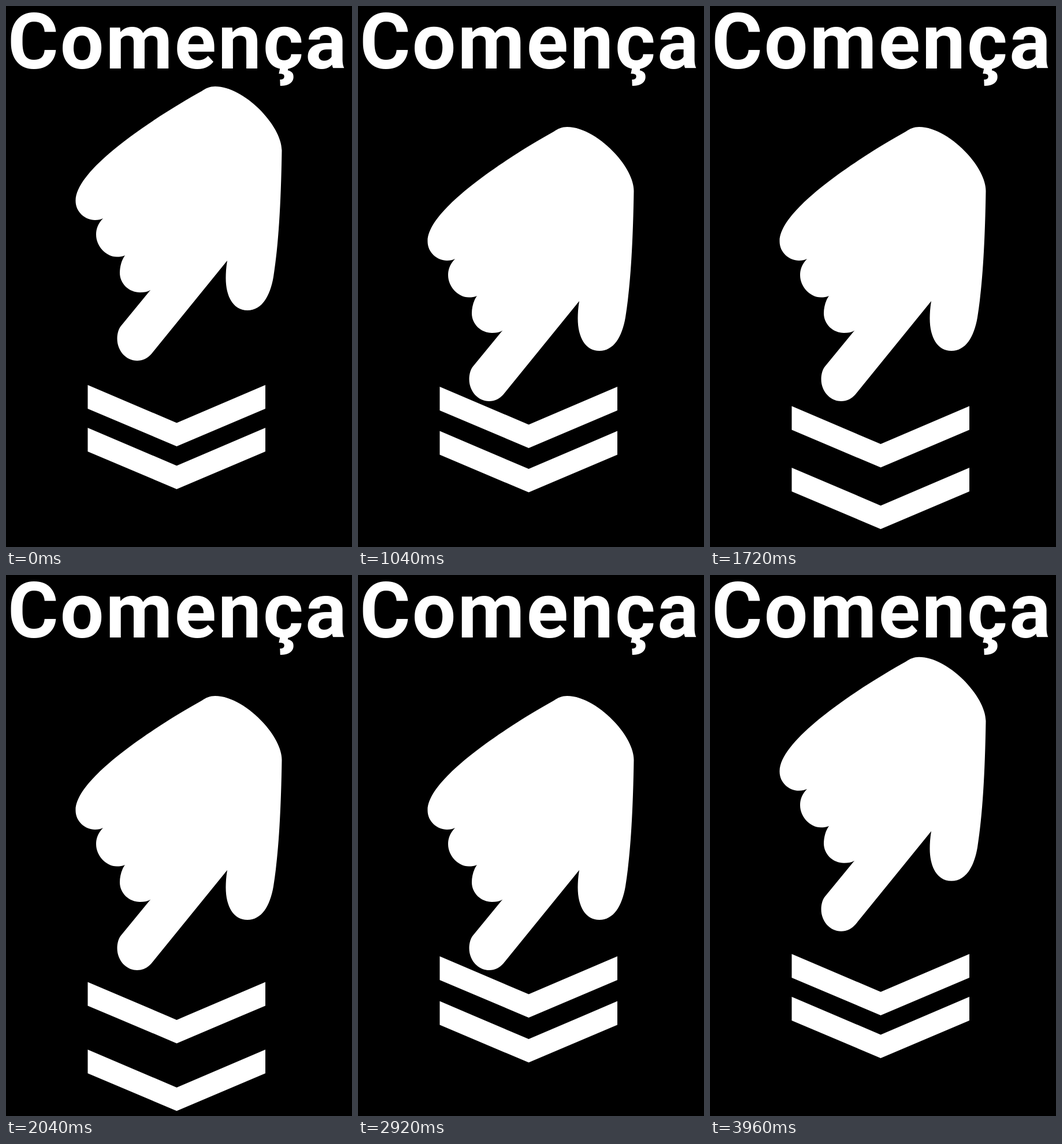
Animation, 599 px wide and 935 px high, one loop 4 s. Source, as an HTML page:

```html
<!DOCTYPE html>
<html lang="ca">
<head>
<meta charset="utf-8">
<title>Comença</title>
<style>
  html, body { margin: 0; width: 100%; height: 100%; overflow: hidden; background: #000; }
  svg { display: block; width: 100%; height: 100%; fill: #fff; }
  text { font: 600 134px Roboto, Arial, sans-serif; letter-spacing: 3px; }
</style>
</head>
<body>
<svg viewBox="0 0 599 935">
  <defs>
    <path id="chevron" d="M141.5 655 L295.5 720.5 L449 655 V696 L295.5 761 L141.5 696 Z"/>
  </defs>
  <text x="3" y="107.5">Comença</text>
  <path id="hand" d="M339 147
    C267 187 121 279 120.5 336 C120 356 137 370 154 370 C160 370 164 369 168 367
    C159 376 156 386 156 395 C156 415 173 433.5 192 433.5 C197 433.5 202 433 206 431
    C200 439 197 451 197 461 C197 480 213 495 232 495 C239 495 245 494 250 491
    L199 553 C195 558 192.5 566 192.5 575 C192.5 596 208 613 227 613 C237 613 245 609 252 601
    L383 440 C381 452 380.5 462 380.5 470 C380.5 503 394 526 418 526
    C442 526 457 503 463 468 C472 412 476 340 477.5 250
    C478 207 412 139 362 139 C353 139 346 142 339 147 Z"/>
  <use id="upper" href="#chevron"/>
  <use id="lower" href="#chevron"/>
</svg>
<script>
  const LOOP = 4000, STEP = 40;
  const [hand, upper, lower] = ['hand', 'upper', 'lower'].map(id => document.getElementById(id));

  const progress = (t, from, to) => Math.min(1, Math.max(0, (t - from) / (to - from)));
  const shift = (part, y) => part.setAttribute('transform', `translate(0 ${y})`);

  // The hand pushes down, the chevrons spread and close, then the hand lifts.
  function draw(now) {
    const t = Math.floor((now % LOOP) / STEP) * STEP;
    const push = progress(t, 0, 1020) - progress(t, 3000, 4000);
    const spread = progress(t, 980, 2000) - progress(t, 2000, 3000);
    shift(hand, 70 * push);
    shift(upper, 50.4 * spread);
    shift(lower, 74 + 95 * spread);
  }

  const start = performance.now();
  function tick() {
    draw(performance.now() - start);
    requestAnimationFrame(tick);
  }
  tick();
</script>
</body>
</html>
```
